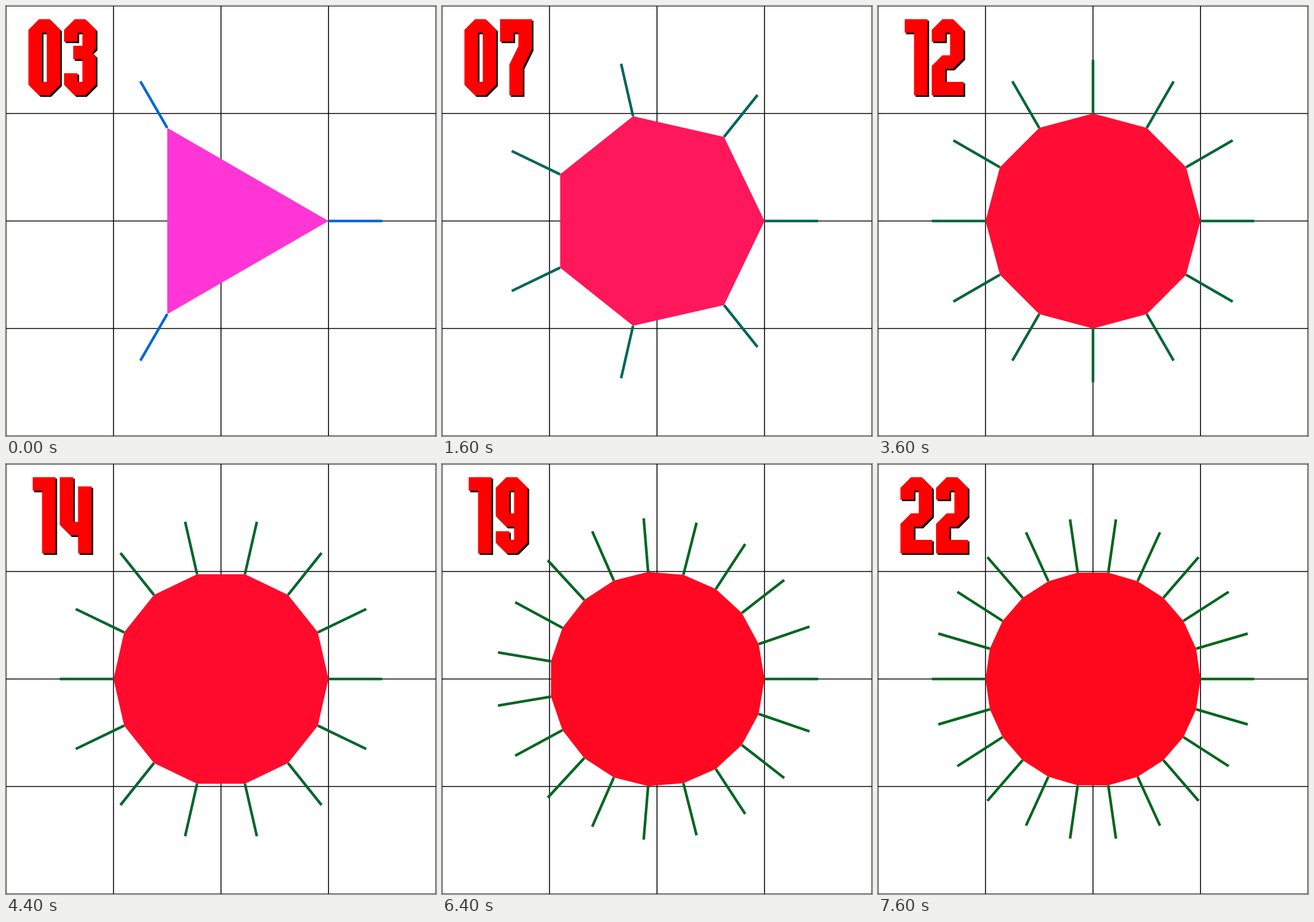
An HTML page with a canvas for the animation above (8000 ms loop, 748 by 748 pixels).

```html
<!DOCTYPE html>
<html lang="en">
<head>
<meta charset="utf-8">
<title>Polygon counter</title>
<style>
html, body { margin: 0; height: 100%; overflow: hidden; background: #fff; }
canvas { display: block; }
</style>
</head>
<body>
<canvas width="748" height="748"></canvas>
<script>
const ctx = document.querySelector('canvas').getContext('2d');
const SIZE = 748, MID = SIZE / 2, CELL = SIZE / 4;
const STEP = 400, FIRST = 3, COUNT = 20;

// Numerals are thick strokes whose outer corners are cut off
const WIDTH = 55.5, TOP = 23, BOTTOM = 155.5, HALF = 11.8, CUT = 18.5, SHADOW = 2.6;
const L = HALF, R = WIDTH - HALF, T = TOP + HALF, B = BOTTOM - HALF;
const HIGH = 81, CENTER = 89, LOW = 97.5, STEM = 28;

// Walks along a centre line and back, keeping to its left edge
function addStroke(path, coords) {
  const line = [];
  for (let i = 0; i < coords.length; i += 2) line.push([coords[i], coords[i + 1]]);
  const walk = [...line, ...line.slice(1, -1).reverse()];
  const count = walk.length;
  const dir = (a, b) => {
    const len = Math.hypot(b[0] - a[0], b[1] - a[1]);
    return [(b[0] - a[0]) / len, (b[1] - a[1]) / len];
  };
  const edge = [];
  walk.forEach(([x, y], i) => {
    const u = dir(walk[(i + count - 1) % count], walk[i]);
    const v = dir(walk[i], walk[(i + 1) % count]);
    if (i % (line.length - 1) === 0) {
      for (const d of [u, v]) edge.push([x + HALF * d[1], y - HALF * d[0]]);
      return;
    }
    const miter = HALF / (1 + u[0] * v[0] + u[1] * v[1]);
    const qx = x + miter * (u[1] + v[1]), qy = y - miter * (u[0] + v[0]);
    const turn = u[0] * v[1] - u[1] * v[0];
    const cut = turn > 0.9 ? CUT : 0;
    edge.push([qx - u[0] * cut, qy - u[1] * cut], [qx + v[0] * cut, qy + v[1] * cut]);
  });
  edge.forEach(([x, y], i) => i ? path.lineTo(x, y) : path.moveTo(x, y));
  path.closePath();
}

function glyph(...strokes) {
  const path = new Path2D();
  strokes.forEach(s => addStroke(path, s));
  return path;
}

const ring = (t, b) => [L, (t + b) / 2, L, t, R, t, R, b, L, b, L, (t + b) / 2];
const upperHook = [L, 62, L, T, R, T];
const lowerHook = [R, B, L, B, L, 117];
const topBar = [0, T, WIDTH, T];

const digits = [
  glyph(ring(T, B)),
  glyph([0, T, STEM, T], [STEM, TOP, STEM, BOTTOM]),
  glyph([...upperHook, R, LOW, L, LOW, L, BOTTOM], [0, B, WIDTH, B]),
  glyph([...upperHook, R, HIGH, 16, HIGH], [16, HIGH, R, HIGH, ...lowerHook]),
  glyph([L, TOP, L, 112.5, R, 112.5], [R, 39, R, BOTTOM]),
  glyph(topBar, [L, TOP, L, HIGH, R, HIGH, ...lowerHook]),
  glyph([R, 62, R, T, L, T, L, B, R, B, R, HIGH, L, HIGH]),
  glyph(topBar, [L, TOP, L, 62], [R, TOP, R, 72.5, STEM, 104.5, STEM, BOTTOM]),
  glyph(ring(T, CENTER), ring(CENTER, B)),
  glyph([R, LOW, L, LOW, L, T, R, T, ...lowerHook])
];

const advance = d => d === 1 ? 47 : 62;

function drawNumber(n, offset, color) {
  const pair = [Math.floor(n / 10), n % 10];
  let x = 101 - (advance(pair[0]) + advance(pair[1])) / 2;
  ctx.fillStyle = color;
  for (const d of pair) {
    ctx.save();
    ctx.translate(x + offset, offset);
    ctx.fill(digits[d]);
    ctx.restore();
    x += advance(d);
  }
}

function drawGrid() {
  ctx.strokeStyle = '#000';
  ctx.lineWidth = 1.6;
  ctx.beginPath();
  for (let p = 0; p <= SIZE; p += CELL) {
    ctx.moveTo(p, 0);
    ctx.lineTo(p, SIZE);
    ctx.moveTo(0, p);
    ctx.lineTo(SIZE, p);
  }
  ctx.stroke();
}

function drawPolygon(n) {
  const shape = new Path2D(), spokes = new Path2D();
  for (let i = 0; i < n; i++) {
    const a = i * 2 * Math.PI / n;
    const at = r => [MID + r * Math.cos(a), MID + r * Math.sin(a)];
    shape.lineTo(...at(CELL));
    spokes.moveTo(...at(CELL));
    spokes.lineTo(...at(CELL * 1.5));
  }
  const blue = Math.round(640 / n);
  ctx.fillStyle = `rgb(255, ${Math.round(160 / n)}, ${blue})`;
  ctx.fill(shape);
  ctx.strokeStyle = `rgb(0, 102, ${blue})`;
  ctx.lineWidth = 4.6;
  ctx.stroke(spokes);
}

function draw(time) {
  const n = FIRST + Math.floor(time / STEP) % COUNT;
  ctx.fillStyle = '#fff';
  ctx.fillRect(0, 0, SIZE, SIZE);
  drawGrid();
  drawPolygon(n);
  drawNumber(n, SHADOW, '#000');
  drawNumber(n, 0, '#f00');
}

const start = performance.now();
function tick() {
  draw(performance.now() - start);
  requestAnimationFrame(tick);
}
tick();
</script>
</body>
</html>
```
